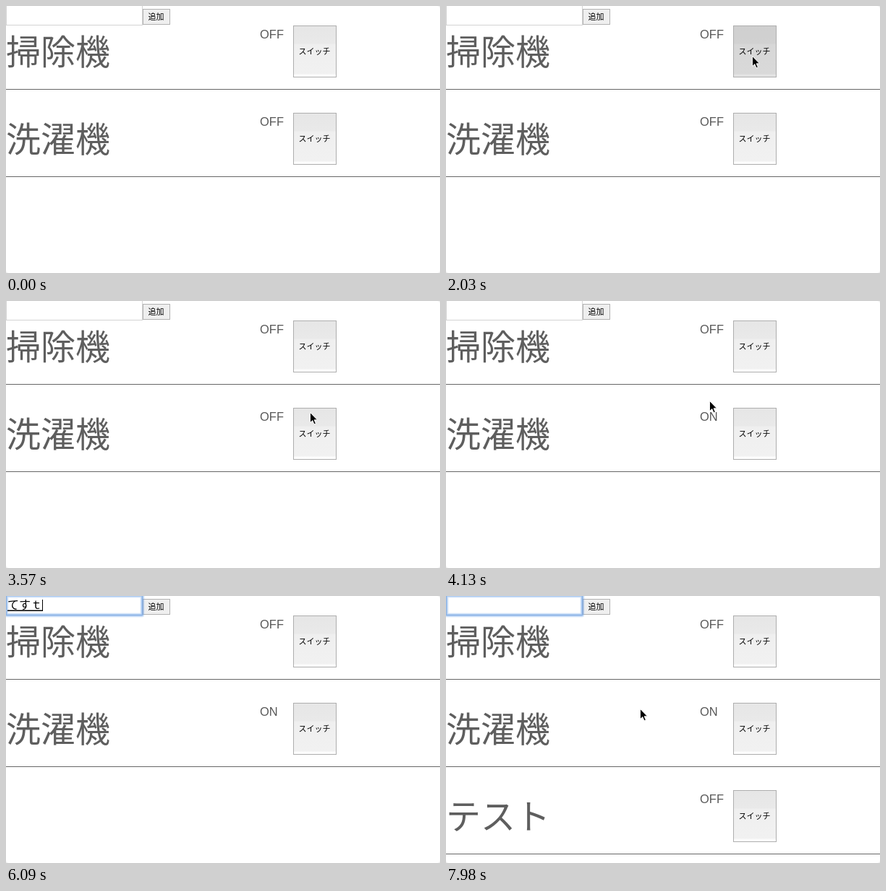
An HTML page that plays this animation: 600 by 370 pixels, repeating every 8000 ms.

```html
<!DOCTYPE html>
<html lang="ja">
<head>
<meta charset="utf-8">
<title>スイッチ</title>
<style>
  html, body { margin: 0; width: 100%; height: 100%; overflow: hidden; background: #ececec; }
  svg { display: block; width: 600px; height: 370px; }
  text { font-family: "Noto Sans CJK JP", "Noto Sans CJK", sans-serif; white-space: pre; }
  .name { font-size: 48px; font-weight: 300; fill: #5e5e5e; }
  .state { font: 16.5px "Liberation Sans", Arial, sans-serif; fill: #585858; }
  .label { font-size: 11px; text-anchor: middle; }
  .entry { font-size: 16px; }
  .press { fill: #000; opacity: .1; }
  .ring { fill: none; stroke: #6ea3e6; }
  .green .ring { stroke: #86d2c4; }
</style>
</head>
<body>
<svg viewBox="0 0 600 370">
  <defs>
    <linearGradient id="face" x2="0" y2="1">
      <stop offset="0" stop-color="#e6e6e6"/>
      <stop offset=".34" stop-color="#e9e9e9"/>
      <stop offset=".37" stop-color="#efefef"/>
      <stop offset=".93" stop-color="#f1f1f1"/>
      <stop offset=".96" stop-color="#fdfdfd"/>
    </linearGradient>
  </defs>
  <rect width="600" height="370" rx="4" fill="#fff"/>

  <g id="rows"></g>

  <rect x="189.5" y="4.5" width="37" height="21" fill="#efefef" stroke="#b2b2b2"/>
  <text class="label" x="207.5" y="19">追加</text>

  <rect x=".5" y="-.5" width="188" height="27" fill="#fff" stroke="#d4d4d4"/>
  <g id="focus">
    <rect class="ring" x=".5" y="-.5" width="188" height="27" rx="1" stroke-width="6" opacity=".2"/>
    <rect class="ring" x=".5" y="-.5" width="188" height="27" rx="1" stroke-width="4" opacity=".3"/>
    <rect class="ring" x=".5" y="-.5" width="188" height="27" rx="1" stroke-width="2" opacity=".45"/>
  </g>
  <rect id="pick" x="2" y="5" width="48" height="16" fill="#b3d3fb"/>
  <text id="entry" class="entry" x="2" y="18"></text>
  <rect id="under" x="2" y="19.5" height="1.5"/>
  <rect id="caret" y="5" width="1" height="16"/>

  <path id="arrow" d="M.5 .5V14.6L3.8 11.6L6 16.8L8.3 15.8L6.1 10.8H10.4Z" stroke="#fff" stroke-width=".9"/>
  <g id="beam" fill="none">
    <path d="M-3.5 -7.5Q0 -7.5 0 -5Q0 -7.5 3.5 -7.5M0 -5V5M-3.5 7.5Q0 7.5 0 5Q0 7.5 3.5 7.5M-2 2H2" stroke="#fff" stroke-width="2.6"/>
    <path d="M-3.5 -7.5Q0 -7.5 0 -5Q0 -7.5 3.5 -7.5M0 -5V5M-3.5 7.5Q0 7.5 0 5Q0 7.5 3.5 7.5M-2 2H2" stroke="#000" stroke-width="1.2"/>
  </g>
</svg>
<script>
  const LOOP = 8000, STEP = 70;
  const $ = id => document.getElementById(id);

  // shown / on / press are [from, to) spans in ms
  const rows = [
    { name: '掃除機', shown: [0, LOOP], on: [2170, 3010], press: [[1960, 2170], [2870, 3010]] },
    { name: '洗濯機', shown: [0, LOOP], on: [4060, LOOP], press: [[3780, 4060]] },
    { name: 'テスト', shown: [7420, LOOP], on: [0, 0], press: [] }
  ];
  $('rows').innerHTML = rows.map((r, i) => `
    <g id="row${i}" transform="translate(0 ${i * 121})">
      <text class="name" x="0" y="81">${r.name}</text>
      <text class="state" id="state${i}" x="351" y="45"></text>
      <rect x="397.5" y="27.5" width="59" height="71" fill="url(#face)" stroke="#aeaeae"/>
      <rect class="press" id="press${i}" x="398" y="28" width="58" height="70"/>
      <text class="label" x="426.5" y="67">スイッチ</text>
      <rect y="115" width="600" height="1" fill="#666"/>
    </g>`).join('');

  const focusSpans = [[1050, 1820], [5180, LOOP]];
  const caretSpans = [[1050, 1540], [5180, 6440], [7000, 7910]];
  const typed = [
    [0, ''], [5600, 'ｔ'], [5670, 'て'], [5810, 'てｓ'], [6020, 'てす'],
    [6090, 'てすｔ'], [6230, 'てすと'], [6440, 'テスト'], [7420, '']
  ];
  // pointer path: time, x, y
  const path = [
    [70, 3, 345], [210, 394, 78], [420, 394, 78], [630, 288, 234], [840, 440, 42],
    [910, 440, 70], [980, 440, 70], [1120, 428, 64], [1400, 428, 64], [1680, 425, 68],
    [1750, 425, 68], [2030, 423, 69], [3220, 423, 69], [3570, 420, 154], [3640, 422, 158],
    [3990, 422, 158], [4410, 249, 99], [4550, 249, 99], [4900, 140, 17], [5040, 153, 17],
    [7910, 153, 17], [7980, 268, 156]
  ];

  const within = (t, [a, b]) => t >= a && t < b;
  const any = (t, spans) => spans.some(s => within(t, s));
  const show = (id, yes) => { $(id).style.display = yes ? '' : 'none'; };

  function pointer(t) {
    const i = path.findIndex(p => p[0] > t);
    if (i < 0) return path[path.length - 1].slice(1);
    if (i === 0) return path[0].slice(1);
    const [t0, x0, y0] = path[i - 1], [t1, x1, y1] = path[i];
    const k = (t - t0) / (t1 - t0);
    return [Math.round(x0 + (x1 - x0) * k), Math.round(y0 + (y1 - y0) * k)];
  }

  function draw(now) {
    const t = Math.floor(now % LOOP / STEP) * STEP;

    rows.forEach((r, i) => {
      show('row' + i, within(t, r.shown));
      show('press' + i, any(t, r.press));
      $('state' + i).textContent = within(t, r.on) ? 'ON' : 'OFF';
    });

    const text = typed.filter(e => e[0] <= t).pop()[1];
    const picked = within(t, [6440, 7000]);
    $('entry').textContent = text;
    $('under').setAttribute('width', within(t, [5600, 7000]) ? text.length * 16 : 0);
    $('caret').setAttribute('x', 2 + text.length * 16);
    $('focus').setAttribute('class', picked ? 'green' : '');
    show('focus', any(t, focusSpans));
    show('caret', any(t, caretSpans));
    show('pick', picked);

    const [x, y] = pointer(t);
    const visible = any(t, [[70, 5600], [7980, LOOP]]);
    const overInput = x < 189 && y < 27;
    show('arrow', visible && !overInput);
    show('beam', visible && overInput);
    for (const id of ['arrow', 'beam']) $(id).setAttribute('transform', `translate(${x} ${y})`);
  }

  function tick() {
    draw(performance.now());
    requestAnimationFrame(tick);
  }
  tick();
</script>
</body>
</html>
```
